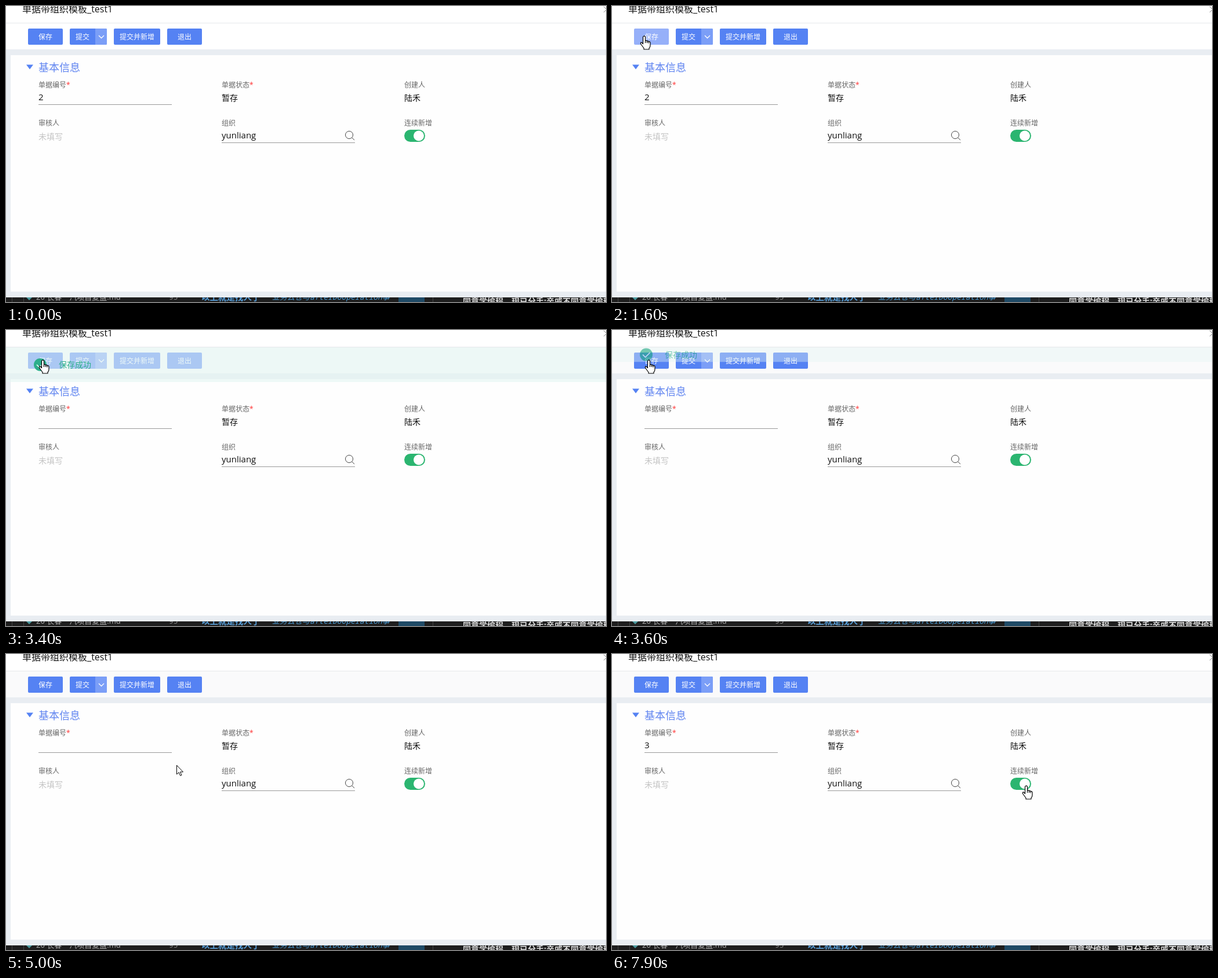
An HTML page that plays this animation: 1035x512 px, repeating every 8 s.

```html
<!DOCTYPE html>
<html lang="zh">
<head>
<meta charset="utf-8">
<style>
html, body { margin: 0; width: 100%; height: 100%; overflow: hidden; background: #fff; }
svg { display: block; font: 12px "Open Sans", "Noto Sans CJK SC", "Noto Sans CJK", sans-serif; }
.button rect { fill: #5582f3; }
.button text { fill: #fff; text-anchor: middle; }
.label { fill: #666; }
.label tspan { fill: #f33; }
.value { font-size: 14px; fill: #111; }
.latin { font-size: 15px; fill: #111; }
.line { stroke: #999; }
#cursor path { fill: #fff; stroke: #000; stroke-linejoin: round; }
</style>
</head>
<body>
<svg width="1035" height="512" viewBox="0 0 1035 512">
  <!-- editor behind the dialog -->
  <rect y="500" width="1035" height="12" fill="#1e1e1e"/>
  <path d="M10.5 504v8M30.5 504v8M736.5 504v8" stroke="#444"/>
  <path d="M35 504h10l-5 5z" fill="#4a9a9f"/>
  <text x="52" y="508" font-size="13" fill="#b0b0b0">20 长春一汽项目复盘.md</text>
  <text x="281" y="508" font-size="13" fill="#858585" font-family="Noto Sans Mono, monospace">95</text>
  <text x="337" y="509" font-size="14.5" font-weight="bold" fill="#569cd6">以上就是找人了</text>
  <text x="459" y="508" font-size="13" font-style="italic" fill="#4a9cd6" font-family="Noto Sans Mono, Noto Sans CJK SC, monospace">业务云仓与afterDoOperation事</text>
  <rect x="677" y="504" width="45" height="8" fill="#1f4a66"/>
  <text x="788" y="516" font-size="14" font-weight="bold" fill="#ddd">同意学编程，现已分手;亲戚不同意学编程</text>

  <!-- dialog -->
  <rect width="1035" height="504" fill="#e9edf2"/>
  <rect width="1035" height="75" fill="#fff"/>
  <rect id="toolbar" y="30" width="1035" height="45"/>
  <path d="M0 29.5H1035" stroke="#e6e8eb"/>
  <rect x="8" y="85" width="1027" height="409" fill="#fefefe"/>
  <text x="28" y="11" font-size="16" fill="#111">单据带组织模板_test1</text>
  <path d="M1031 1l10 10M1031 11l10-10" stroke="#888"/>

  <g class="button">
    <rect id="save" x="38" y="39" width="60" height="28" rx="2"/><text x="68" y="58">保存</text>
    <rect x="110" y="39" width="64" height="28" rx="2"/><text x="132" y="58">提交</text>
    <path d="M154 39h18q2 0 2 2v24q0 2-2 2h-18z" fill="#7b9ef7"/>
    <path d="M160 51l4.500 4.500 4.500-4.500" fill="none" stroke="#fff" stroke-width="1.300"/>
    <rect x="186" y="39" width="80" height="28" rx="2"/><text x="226" y="58">提交并新增</text>
    <rect x="278" y="39" width="60" height="28" rx="2"/><text x="308" y="58">退出</text>
  </g>

  <path d="M35 101.500h12l-6 8z" fill="#5582f3"/>
  <text x="56" y="113" font-size="18" fill="#5e83f0">基本信息</text>

  <g class="label">
    <text x="56" y="141">单据编号<tspan>*</tspan></text>
    <text x="372" y="141">单据状态<tspan>*</tspan></text>
    <text x="687" y="141">创建人</text>
    <text x="56" y="207">审核人</text>
    <text x="372" y="207">组织</text>
    <text x="687" y="207">连续新增</text>
  </g>
  <text class="latin" id="number" x="56" y="163"></text>
  <path id="underline" class="line" d="M56 170.500H286"/>
  <path id="caret" d="M56.500 148v19" stroke="#000"/>
  <text class="value" x="372" y="164">暂存</text>
  <text class="value" x="687" y="164">陆禾</text>
  <text class="value" x="56" y="231" style="fill:#c4c4c4">未填写</text>
  <text class="latin" x="372" y="229">yunliang</text>
  <path class="line" d="M372 236.500H602"/>
  <path id="list" d="M562.500 219.500h11v11h-11zM565 223h6M565 227h6" fill="none" stroke="#666"/>
  <g fill="none" stroke="#444"><circle cx="592" cy="223" r="6.500"/><path d="M596.500 227.500l4.500 4.500"/></g>
  <rect x="687" y="214" width="36" height="21" rx="10.500" fill="#2bb570"/>
  <circle cx="712" cy="224.500" r="9" fill="#fff"/>

  <g id="toast">
    <rect id="toastBack" y="30" width="1035" fill="#e4f7f3" opacity=".6"/>
    <g id="toastBody">
      <circle cx="59" r="11" fill="#2cae8b"/>
      <path d="M53 0l4.500 4.500 8-8" fill="none" stroke="#fff" stroke-width="1.500"/>
      <text x="91" y="5" font-size="14" fill="#2cae8b">保存成功</text>
    </g>
  </g>

  <g id="cursor">
    <path id="arrow" d="M.5 .5V16l3.700-3.200 2.500 5.700 2.300-1-2.500-5.500H11.500z"/>
    <path id="hand" stroke-width="1.200" d="M-1.500 1.500Q0-1 2 .5L2.500 2V8Q4 7 5.500 8.500 7 8 8 9.500 10.500 9 11 11.500V16Q11 19 9 21V23H0V21Q-3 17-5.500 13.500-6 10.500-4 11L-1.500 13.500zM2.500 8v4M5.500 8.500V12M8 9.500V12.500"/>
    <path id="beam" style="fill:none" d="M-3.500-7.500H-1L0-6.500 1-7.500H3.500M0-6.500V6.500M-3.500 7.500H-1L0 6.500 1 7.500H3.500"/>
  </g>
</svg>
<script>
const $ = id => document.getElementById(id);
const show = (id, on) => $(id).style.display = on ? '' : 'none';
const between = (v, low, high) => v >= low && v < high;
const STEP = 100, LOOP = 8000;
const SAVED = 34, FOCUSED = 52, TYPED = 64, BLURRED = 69;

// Each stroke of the mouse eases out towards a goal, bowed vertically by sag
const strokes = [
  { start: 1, end: 10, x: 55, y: 52, sag: -250 },
  { start: 16, end: 24, x: 681, y: 284, sag: 127 },
  { start: 24, end: 30, x: 58, y: 56, sag: 70 },
  { start: 33, end: 34, x: 63, y: 52, sag: 0 },
  { start: 41, end: 50, x: 294, y: 192, sag: 25 },
  { start: 50, end: 52, x: 164, y: 158, sag: 0 },
  { start: 65, end: 69, x: 40, y: 52, sag: 0 },
  { start: 70, end: 75, x: 900, y: 300, sag: 0 },
  { start: 75, end: 79, x: 714, y: 228, sag: 0 }
];

function pointerAt(step) {
  let px = 1100, py = 520;
  for (const { start, end, x, y, sag } of strokes) {
    if (step <= start) break;
    const rest = (1 - Math.min(1, (step - start) / (end - start))) ** 3;
    px = x + (px - x) * rest;
    py = y + (py - y) * rest + 2 * rest * (1 - rest) * sag;
  }
  return [Math.round(px), Math.round(py)];
}

const inside = ([x, y], left, top, right, bottom) => between(x, left, right) && between(y, top, bottom);
const onSave = p => inside(p, 38, 39, 98, 67);

// The message stays open for two steps, then collapses upwards and fades
function drawToast(step) {
  const closing = Math.max(0, step - SAVED - 1);
  const height = 60 * .42 ** closing;
  show('toast', between(step, SAVED, SAVED + 4));
  $('toast').style.opacity = .65 ** closing;
  $('toastBack').setAttribute('height', height);
  $('toastBody').setAttribute('transform', `translate(0 ${30 + height / 2})`);
}

function drawPointer(p) {
  const hand = onSave(p) || inside(p, 687, 214, 723, 235);
  const beam = inside(p, 56, 148, 286, 171);
  show('hand', hand);
  show('beam', beam);
  show('arrow', !hand && !beam);
  show('list', inside(p, 372, 213, 602, 237));
  $('cursor').setAttribute('transform', `translate(${p})`);
}

function draw(now) {
  const step = Math.floor(now % LOOP / STEP);
  const p = pointerAt(step);
  drawPointer(p);
  drawToast(step);

  const hover = onSave(p) && onSave(pointerAt(step - 1));
  $('save').style.fill = hover && !between(step, SAVED, SAVED + 3) ? '#96b0f9' : '#5582f3';
  $('toolbar').style.fill = step < SAVED ? '#fff' : '#fafafb';

  const focused = between(step, FOCUSED, BLURRED);
  const typed = step >= TYPED;
  $('number').textContent = step < SAVED ? '2' : typed ? '3' : '';
  $('underline').style.stroke = focused ? '#5582f3' : '#999';
  show('caret', focused && Math.floor((step + 1) / 5) % 2);
  $('caret').setAttribute('transform', `translate(${typed ? 8 : 0})`);
}

function frame() {
  draw(performance.now() - start);
  requestAnimationFrame(frame);
}
const start = performance.now();
frame();
</script>
</body>
</html>
```
